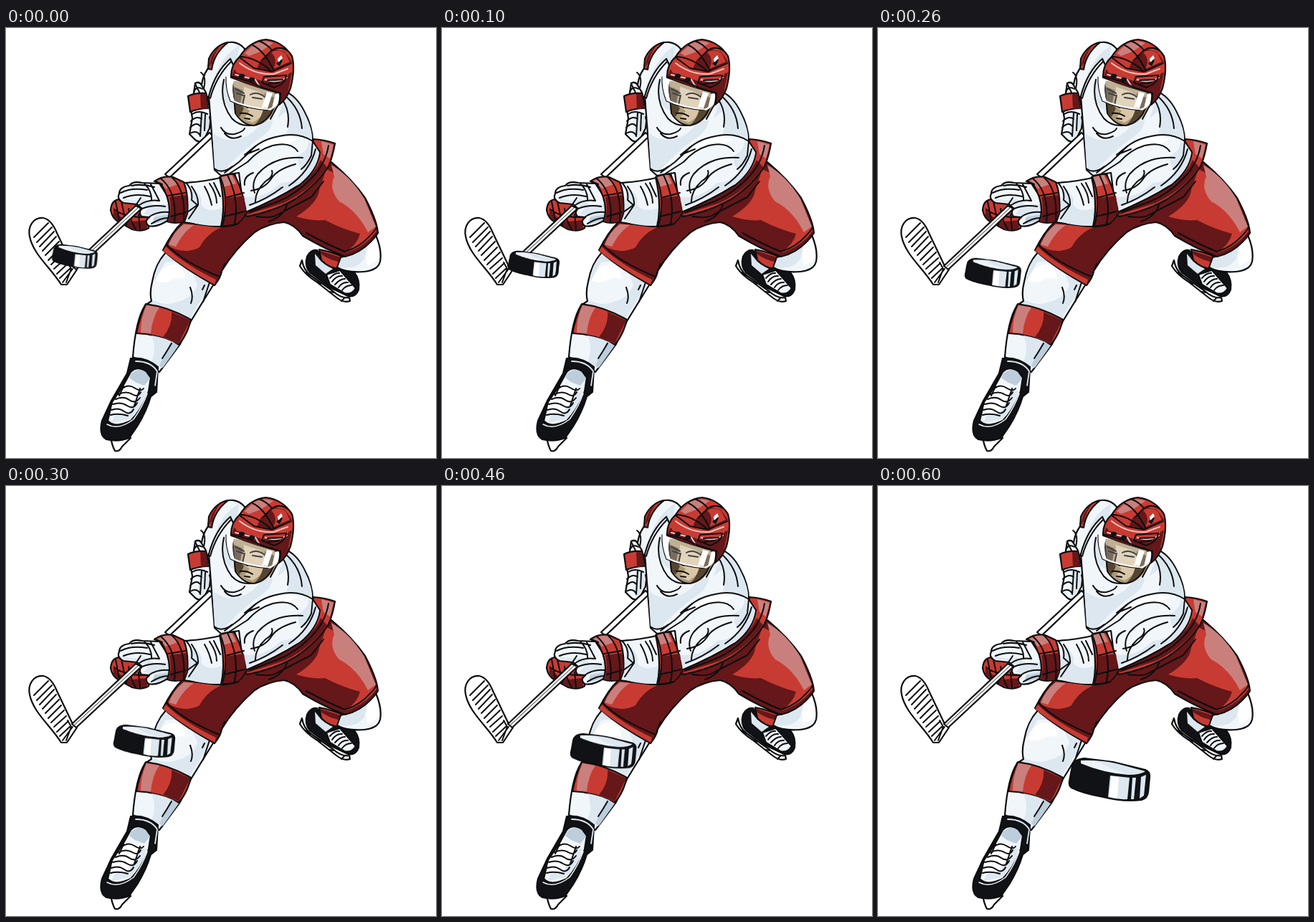
These frames come from a looping animation (600x600 px, 700 ms). An HTML page:

```html
<!DOCTYPE html>
<html lang="en">
<head>
<meta charset="utf-8">
<title>Hockey player</title>
<style>
html, body { margin: 0; width: 100%; height: 100%; overflow: hidden; background: #fff; }
svg { display: block; width: 100vw; height: 100vh; }
path { stroke-linecap: round; stroke-linejoin: round; }
.ink path { fill: none; stroke: #0c0d0f; stroke-width: 2; }
.w, .r, .d, .k { stroke: #0c0d0f; stroke-width: 2.2; }
.w, .cloth { fill: #f1f6fb; }
.white { fill: #fff; }
.shade { fill: #dce7f0; }
.deep { fill: #bccddb; }
.r, .red { fill: #c83b32; }
.d, .dark { fill: #651719; }
.pink { fill: #c9807d; }
.k, .black { fill: #101215; }
.skin { fill: #ad9874; }
.light { fill: #d9c6a8; }
.brown { fill: #55442f; }
#puck { animation: slide 700ms step-end infinite; }
@keyframes slide {
  0% { transform: translate(64px, 301px) scale(.56); }
  14.285% { transform: translate(92px, 310px) scale(.63); }
  28.571% { transform: translate(121px, 320px) scale(.69); }
  42.857% { transform: translate(150px, 332px) scale(.755); }
  57.142% { transform: translate(179px, 344px) scale(.81); }
  71.428% { transform: translate(208px, 356px) scale(.877); }
  85.714%, 100% { transform: translate(266px, 378px) scale(1); }
}
</style>
</head>
<body>
<svg viewBox="0 0 600 600">

<g id="back-arm">
  <path class="w" d="M333 29C324 18 310 17 299 25C288 32 284 43 282 56C275 66 272 78 272 90L284 98L290 150L330 110Z"/>
  <path class="shade" d="M326 24C309 34 299 48 291 68C286 82 284 92 285 104L301 86L322 45Z"/>
  <path class="r" d="M310 20C298 22 288 31 283 43L282 57L287 58C289 43 297 30 310 20Z"/>
  <path class="dark" d="M298 26C289 33 284 44 284 54L288 48Q290 37 298 26Z"/>
  <path class="w" d="M264 77Q270 74 273 80L279 90L286 119L284 140L277 154Q269 162 263 155L256 148L260 126L258 114L262 91Z"/>
  <path class="shade" d="M270 116L284 120L283 139L274 154L268 151Z"/>
  <path class="r" d="M254 95Q264 90 278 91L282 112Q270 112 257 117Z"/>
  <path class="dark" d="M271 92L279 92L282 112L272 113Z"/>
  <g class="ink">
    <path d="M262 89Q266 80 274 85M260 120Q269 114 281 120M258 130Q266 122 273 127M257 139Q266 130 271 137M257 147Q266 142 271 150M273 119L271 151M278 121L277 143M284 124L288 145M272 62Q280 68 276 84M264 78L270 90"/>
  </g>
</g>

<path class="w white" stroke-width="1.8" d="M284 146L222 204L228 209L289 151Z"/>

<g id="back-leg">
  <path class="k" d="M420 319Q425 309 434 310L444 324L460 336L486 341Q494 351 492 365Q488 376 477 374L452 362L424 341Q416 332 420 319Z"/>
  <path class="shade" d="M431 315L440 326L456 336L446 343L432 331Z"/>
  <path class="w" d="M447 344L466 338L488 363Q482 373 472 370L452 358Z"/>
  <path class="w white" d="M413 324L410 332Q417 344 433 354L461 376Q471 384 480 381L479 376Q468 378 456 367L426 346Q415 338 413 324Z"/>
  <g class="ink"><path d="M452 349Q459 341 465 342M455 354Q461 345 469 346M459 358Q466 350 473 350M464 362Q469 354 477 355M469 366Q474 359 482 359M424 346L419 341M439 357L435 353M457 369L452 368M472 377L468 381"/></g>
  <path class="r" d="M437 309Q454 312 472 320L467 336Q451 336 440 324Z"/>
  <path class="dark" d="M439 311L470 321L468 327Q451 324 439 315Z"/>
  <path class="w" d="M467 320Q492 315 516 289Q525 310 522 326Q519 338 500 340Q476 342 462 334Z"/>
  <path class="shade" d="M468 322Q488 318 504 305L500 322Q490 337 467 334L464 332Z"/>
  <path class="white" d="M508 302L516 294Q521 308 519 322Q513 329 504 331Q500 313 508 302Z"/>
</g>

<g id="front-leg">
  <path class="w" d="M223 313Q208 330 204 354Q200 370 203 381L194 387Q181 407 177 459L214 480L243 441L258 409L274 383L292 354Z"/>
  <path class="shade" d="M223 316L285 347L287 358L270 383L255 407L198 387L206 380Q223 389 240 382Q262 376 267 358L258 336Q237 323 222 327L207 354Q207 332 223 316Z"/>
  <path class="white" d="M209 352Q217 329 237 330Q250 335 250 350Q237 347 229 353Q217 358 209 352Z"/>
  <path class="r" d="M195 385Q227 389 258 407Q253 428 241 442Q212 427 182 426Q186 404 195 385Z"/>
  <path class="dark" d="M231 396L257 408L241 440L219 431Q233 414 231 396Z"/>
  <path class="pink" d="M196 387L214 390Q204 404 202 426L188 425Q188 405 196 387Z"/>
  <path class="shade" d="M203 429Q227 433 239 442L217 475L203 466Q211 447 203 429Z"/>
  <path class="deep" d="M230 438L241 443L219 474L214 471Z"/>
  <g class="ink"><path d="M277 359L274 365M284 355Q278 373 275 382M257 362Q262 374 258 384M218 461Q224 452 231 440"/></g>
</g>

<g id="front-skate">
  <path class="w white" d="M146 571Q148 583 152 590Q158 592 162 584L174 572L166 567Z"/>
  <path class="k" d="M174 461Q194 458 212 473L210 507L202 514Q196 535 183 556L172 572Q157 578 140 574Q129 568 134 548L147 520L169 482Z"/>
  <path class="w" d="M174 480Q183 471 195 479L202 488L199 507Q189 533 174 548Q151 559 142 548L148 522L163 500Z"/>
  <path class="deep" d="M175 482Q185 473 195 480L201 489L193 499L180 494L172 488Z"/>
  <path class="shade" d="M180 512L196 505Q188 533 172 546L147 551L152 541L171 536Z"/>
  <path class="white" d="M166 500Q175 494 186 502L181 522L163 541L150 538Q143 528 155 516Z"/>
  <path d="M181 465Q202 465 211 479L208 499" fill="none" stroke="#dce7f0" stroke-width="1.8"/>
  <path d="M141 553Q157 562 178 546Q191 528 197 510" fill="none" stroke="#f1f6fb" stroke-width="1.5"/>
  <g class="ink"><path d="M161 504Q170 496 179 502T192 503M157 511Q168 506 176 511T188 508M153 518Q164 513 172 519T187 516M149 525Q160 521 169 527T183 523M147 533Q157 529 165 535T178 532M146 540Q157 537 170 541M164 500L158 513M187 503L179 527M207 500L210 508L201 515"/></g>
</g>

<g id="pants">
  <path class="d" d="M246 271Q232 284 219 310Q244 333 291 359Q300 348 301 339Q319 309 347 285Q365 273 388 271Q403 274 414 290Q446 309 473 319Q500 313 519 286Q518 269 501 237Q483 211 454 187L380 230L330 260Z"/>
  <path class="red" d="M248 273L301 278Q281 286 270 306Q250 317 226 304Q234 285 248 273Z"/>
  <path class="pink" d="M248 274L262 275Q247 285 237 305L227 302Q234 284 248 274Z"/>
  <path class="red" d="M447 197Q485 214 505 250L517 283Q502 305 473 314Q491 301 494 287Q470 281 445 268Q427 270 405 263Q435 245 437 226Z"/>
  <path class="pink" d="M454 191Q481 207 500 238L516 277L505 285Q490 255 465 242Q450 225 458 207Z"/>
  <path class="red" d="M223 305Q247 329 293 351L291 358Q247 334 219 311Z"/>
  <g class="ink"><path d="M224 302Q244 325 298 347M419 286Q450 303 473 312Q498 305 517 279M349 263Q369 266 378 261T426 236L443 214M392 247Q386 264 367 270M305 329L300 342"/></g>
</g>

<g id="jersey">
  <path class="r" d="M429 155Q445 156 459 161Q456 179 450 193Q435 217 405 238Q374 256 336 263L328 250L386 221Q420 200 429 155Z"/>
  <path class="dark" d="M439 184L448 194Q426 226 388 244L335 261L334 251L390 228Q428 211 439 184Z"/>
  <path class="pink" d="M440 158L457 163L452 182L443 176Z"/>
  <path class="w" d="M313 43Q292 61 283 95L287 148L291 198L300 206L325 202L332 258Q378 239 409 219Q435 198 438 173L428 158Q428 138 416 116Q405 94 388 88L340 100Z"/>
  <path class="shade" d="M391 91Q407 98 417 120Q428 142 427 156L418 151Q407 148 391 149Q397 135 391 116L379 126Z"/>
  <path class="shade" d="M288 146Q306 161 329 154Q347 147 357 131L372 128Q371 143 355 153Q327 173 300 203L291 195Z"/>
  <path class="shade" d="M422 157L437 174Q434 198 409 218L333 254L330 235Q360 240 384 216Q403 215 415 202Q405 190 408 178Q423 170 422 157Z"/>
  <path class="shade" d="M306 69L314 78L318 116Q303 108 301 91Z"/>
  <path class="white" d="M353 164Q382 146 407 155Q388 166 370 163L342 181Q344 170 353 164Z"/>
  <g class="ink">
    <path d="M314 47Q293 68 285 98M304 72Q297 102 315 126Q325 137 342 136M300 139Q306 150 319 148Q331 145 333 140M305 147Q314 158 328 151M385 99Q397 116 393 138M389 94Q411 113 413 140M428 158Q408 145 381 151Q354 156 340 173L325 187L305 202M353 169L333 177L349 164M407 172Q397 158 372 164Q352 170 337 187L312 203M414 181Q397 180 382 184Q363 190 351 204Q342 217 347 230M404 190Q379 197 371 209Q362 224 342 227M371 199Q374 207 362 214Q347 228 348 244M386 222Q364 239 340 247M432 169Q424 200 395 220M428 158L426 178Q420 191 412 197M292 197Q302 204 316 193M345 202Q331 207 333 219M450 164Q446 190 425 211T380 242L340 257"/>
  </g>
</g>

<g id="front-arm">
  <path class="w" d="M248 216Q274 215 299 209L319 203L334 253L324 273Q307 280 276 275L248 271Z"/>
  <path class="shade" d="M258 221Q276 234 272 246Q280 259 302 251L300 276Q274 277 251 269Z"/>
  <path class="r" d="M298 208Q309 203 318 204Q329 221 335 257Q330 271 318 274L300 277Q307 247 298 208Z"/>
  <path class="dark" d="M306 238L332 234L335 257L324 272L301 276Q306 257 306 238Z"/>
  <path class="pink" d="M300 208L315 205L321 217L303 222Z"/>
  <g class="ink"><path d="M299 208Q312 238 302 276M309 205Q326 239 319 273M277 221Q284 233 287 247M284 217Q294 231 294 244M290 216L299 235M259 221Q269 235 268 247L255 266M252 217Q261 227 259 240L267 247L253 257M306 237L332 230M304 263L333 256"/></g>
</g>

<g id="head">
  <path class="skin" d="M315 74L321 120Q328 133 345 136Q359 136 369 124L381 103L365 74Z"/>
  <path class="light" d="M332 82L355 90L364 105Q361 123 344 132L331 127L340 116L332 110Z"/>
  <path class="brown" d="M316 81L330 87L327 106L332 112L326 124L319 117Z"/>
  <path class="brown" d="M361 91L374 97L370 121Q358 135 347 135Q362 121 361 91Z"/>
  <g class="ink">
    <path d="M320 85L332 91M341 93Q350 88 361 96" stroke-width="3"/>
    <path d="M322 91L331 94M344 97L357 99M333 94L330 107L337 111M327 119Q336 118 344 123M333 126L340 127M316 75L320 119Q331 136 346 136Q367 132 375 107"/>
  </g>
  <path d="M308 69Q306 84 314 101Q335 111 367 114Q380 109 383 91Q349 79 319 72Z" fill="#fff" fill-opacity=".22" stroke="#fff" stroke-width="2.5"/>
  <path class="white" d="M308 68L318 73Q313 88 319 102L312 99Q306 84 308 68ZM364 89L372 91L365 112L357 111ZM376 92L383 91Q381 106 371 112Z"/>
  <path d="M307 68Q306 85 313 102Q335 113 367 115" fill="none" stroke="#0c0d0f" stroke-width="1.1"/>
  <path class="r" d="M314 67Q314 51 326 40Q340 18 363 16Q386 19 399 39Q404 56 397 84Q391 100 381 107L383 91Q350 83 314 69Z"/>
  <path class="dark" d="M318 58Q342 71 370 71L399 62L393 91L383 105L384 91Q347 83 315 69Z"/>
  <path class="red" d="M320 53Q344 67 371 66L398 54Q396 67 386 72L357 74L321 62Z"/>
  <path class="pink" d="M346 23Q360 15 373 21L355 33L339 39L333 35Z"/>
  <path class="dark" d="M355 45L374 29L389 33L399 47L371 61L350 57Z"/>
  <path class="red" d="M370 34Q379 28 390 35L396 47L373 57Q380 44 370 34Z"/>
  <path d="M326 49Q348 66 374 64L393 57M320 65L348 72L354 82M362 72Q378 78 392 69" fill="none" stroke="#f0c6c2" stroke-width="2"/>
  <g class="ink">
    <path d="M328 40Q351 42 371 61M344 24Q360 31 374 60M326 41L346 56L371 61L398 49M353 18Q365 23 371 31Q382 24 393 32M371 31L358 44M315 68Q337 72 357 83L383 91M360 68L391 66Q390 78 374 83L357 76ZM365 73L386 72M366 78L381 76M382 92Q385 102 377 112L369 127"/>
  </g>
  <path class="black" d="M325 66a4 3 0 1 0 8 2a4 3 0 1 0 -8 -2M339 71a4 3 0 1 0 8 2a4 3 0 1 0 -8 -2M377 50l6 -7l3 2l-4 8Z"/>
  <path class="white" d="M379 43L384 38L386 42L380 48Z"/>
</g>

<g id="blade">
  <path class="w white" d="M33 291C30 277 38 264 52 265C61 267 67 276 71 286L93 332L99 337L85 358L77 358C62 334 38 316 33 291Z"/>
  <g class="ink">
    <path d="M39 292L59 272M43 299L64 278M47 305L67 284M51 311L70 291M55 317L74 298M59 324L77 306M63 330L81 313M67 336L84 321M71 343L87 328M75 349L90 335M79 355L93 336M84 355L91 336L86 327"/>
  </g>
</g>

<g id="front-glove">
  <path class="r" d="M158 239Q147 240 146 254Q148 266 158 271L176 281Q190 285 199 279L203 258L181 244Z"/>
  <path class="dark" d="M150 250Q155 265 175 270L199 268L196 280Q180 284 166 275L150 264Z"/>
  <g class="ink"><path d="M153 242L158 269M161 242L168 275M171 252Q173 268 181 281M185 260L187 281M151 253Q166 265 198 264"/></g>
  <path class="w white" d="M181 248L92 332L98 337L189 252Z"/>
  <path d="M184 251L96 333" fill="none" stroke="#0c0d0f" stroke-width=".9"/>
  <path class="w" d="M158 231Q158 222 172 220Q177 213 190 216L214 217L232 245L228 267Q211 279 199 276Q192 270 200 264L189 263Q184 257 190 252L183 246L164 244Q154 239 158 231Z"/>
  <path class="shade" d="M161 236Q178 243 194 239L208 248L227 245L228 264Q213 275 202 273L207 262L192 260L199 251L184 244L165 242Z"/>
  <path class="deep" d="M207 264L228 260L225 268L205 274Z"/>
  <g class="ink"><path d="M160 230Q175 222 197 226M164 237Q181 230 201 235M175 220Q190 217 207 222M186 247Q198 239 213 241M190 252Q205 246 222 249M199 264Q211 255 228 257M193 217Q204 228 203 241M202 218L214 241M182 246L188 237M203 273Q217 264 229 265"/></g>
  <path class="r" d="M207 214Q219 205 233 208L248 215Q255 232 253 259L249 270Q236 274 225 270Q234 247 216 217Z"/>
  <path class="dark" d="M228 236L252 233L253 259L248 270Q236 273 227 269Q232 253 228 236Z"/>
  <path class="pink" d="M211 214Q223 206 236 211L240 218L223 224L216 216Z"/>
  <g class="ink"><path d="M216 210Q239 229 235 271M232 209Q251 226 248 269M226 234L250 230M230 263L251 257M208 214L218 218"/></g>
</g>

<g id="puck">
  <path class="k" d="M5 13Q7 3 22 2L62 7L107 18Q114 21 113 28L111 49Q110 58 102 60Q76 63 48 56Q20 51 4 43Q0 40 1 34Z"/>
  <path class="shade" d="M17 5Q42 4 66 9L107 20Q101 25 83 25Q51 23 17 9Z"/>
  <path class="white" d="M17 5L42 7L59 16L83 24Q46 22 17 9Z" opacity=".45"/>
  <path class="shade" d="M58 26L85 29L82 59Q69 60 55 56Z"/>
  <path class="white" d="M60 27L70 28L68 58L57 56Z"/>
  <path class="shade" d="M89 29L94 29L91 59L87 59ZM101 28L108 25L105 54L99 58Z"/>
</g>

</svg>
</body>
</html>
```
